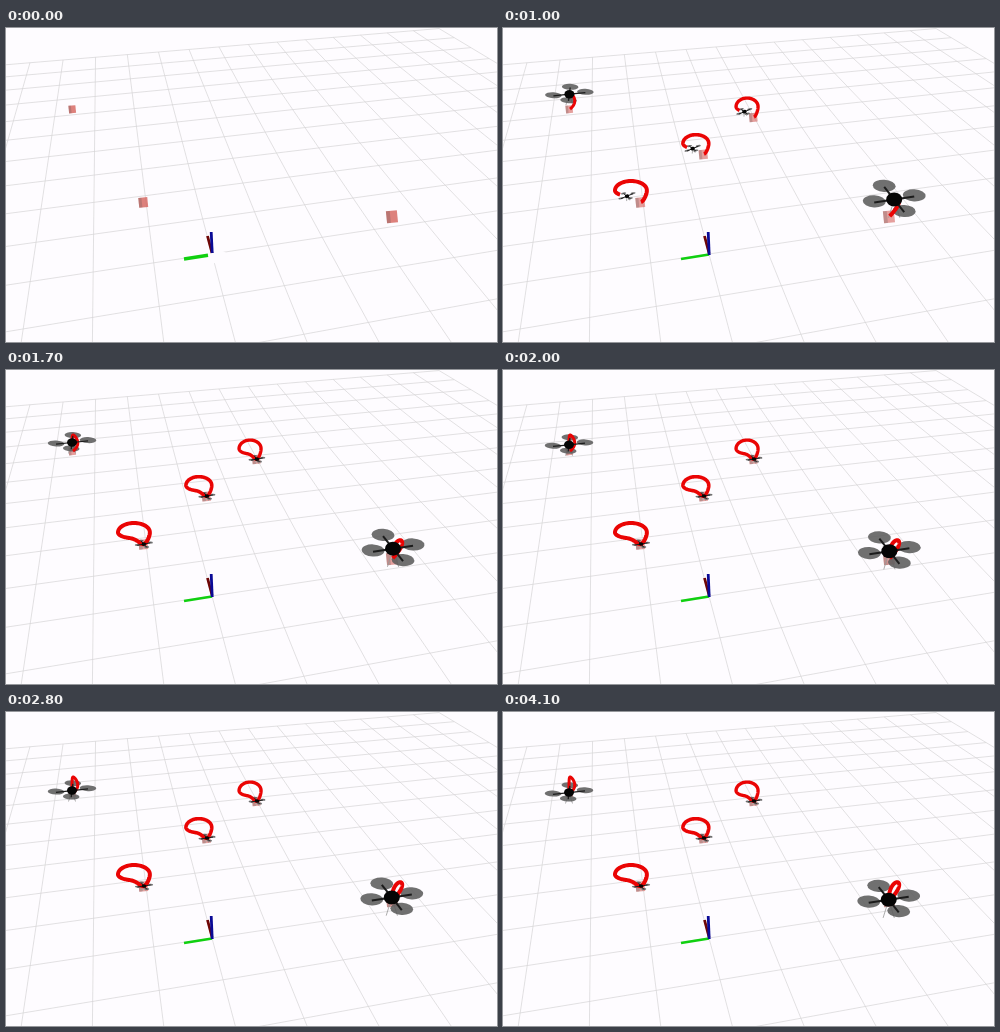
An HTML page with a canvas that plays this animation: 491x314 px, repeating every 4.2 s.

```html
<!DOCTYPE html>
<html lang="en">
<head>
<meta charset="utf-8">
<title>Drone flight</title>
<style>
  html, body { margin: 0; overflow: hidden; background: #fefcff; }
  canvas { display: block; }
</style>
</head>
<body>
<canvas id="stage" width="491" height="314"></canvas>
<script>
const ctx = document.getElementById('stage').getContext('2d');
const LOOP = 4.2, STEP = 0.1, START = 0.1, TRAIL_LAG = 0.09; // seconds
const PAPER = '#fefcff';
const { PI, sin, cos, exp, max } = Math;

// Rises from 0 to 1 at time `peak`, then decays.
const hop = (s, peak) => s / peak * exp(1 - s / peak);

// A rounded loop with a corner at the start point, flown once while slowing down.
function loopPath(scaleX, scaleY) {
  return s => {
    const corner = -PI / 4;
    const angle = corner + 2 * PI * (1 - exp(-((s / 0.68) ** 2.1)));
    const pull = max(0, cos(angle - corner)) ** 6;
    const up = sin(angle);
    return [scaleX * (16 * cos(angle) - 10 - 1.3 * pull),
            scaleY * (7.5 * pull - 11.5 - up * (up > 0 ? 9.5 : 5.7))];
  };
}

// A quick rise with a sideways swing, then a slow descent.
function hoverPath(swing, swingPeak, height) {
  return s => [swing * hop(s, swingPeak) - (1 - exp(-2 * s)), -height * hop(s, 0.62)];
}

const smallDrone = (start, box, scaleX, scaleY, late) => ({
  start, box, late, path: loopPath(scaleX, scaleY), trail: 2 + 2 * scaleX,
  arms: [[6.5 * scaleY, -scaleY], [2.7 * scaleY, 3.2 * scaleY]],
  blade: [2.6, 1], hub: [2.2, 1.8], tilt: -0.9
});

const drones = [
  { start: [67, 81], box: 7, path: hoverPath(5, 0.15, 16), trail: 3, tilt: 0,
    arms: [[16, -1.7], [-0.8, 6.7]], blade: [8.3, 3], hub: [5, 4.2] },
  smallDrone([251, 89], 8, 0.69, 0.9, true),
  smallDrone([201, 126], 8.5, 0.81, 0.92, true),
  smallDrone([138, 174], 9, 1, 1, false),
  { start: [386.7, 188.2], box: 11, path: hoverPath(10, 0.35, 18), trail: 4, tilt: 0,
    arms: [[20, -3], [10, 12.6]], blade: [11.4, 6.1], hub: [8, 7] }
];

function line(points, color, width) {
  ctx.beginPath();
  points.forEach(p => ctx.lineTo(...p));
  ctx.strokeStyle = color;
  ctx.lineWidth = width;
  ctx.stroke();
}

function ellipse(x, y, rx, ry, angle, color) {
  ctx.beginPath();
  ctx.ellipse(x, y, rx, ry, angle, 0, 2 * PI);
  ctx.fillStyle = color;
  ctx.fill();
}

// Ground plane in perspective, from its origin and two vanishing points.
function project(i, j) {
  const a = i * 0.01879, b = j * 0.0886, w = 1 + a + b;
  return [(206 + 3249 * a + 92.1 * b) / w, (226 - 235 * a - 204 * b) / w];
}

function drawGrid() {
  for (let n = -10; n <= 10; n++) {
    line([project(n, -4), project(n, 10)], '#d6d4d6', 0.7);
    if (n >= -4) line([project(-10, n), project(10, n)], '#d6d4d6', 0.7);
  }
}

function drawAxes(running) {
  if (!running) ellipse(211, 229, 11, 6, -0.15, PAPER);
  line([[178, 231], running ? [206, 226.5] : [202, 227.3]], '#10d010', running ? 2.6 : 3.4);
  line([[201.5, 208], [206, 225]], '#6e0606', 2.8);
  line([[205.2, 204], [206.2, running ? 227 : 225]], '#0a0a96', 2.8);
}

function drawBox({ start: [x, y], box }, running) {
  const h = box / 2;
  ctx.save();
  ctx.translate(x - 0.8, y);
  ctx.rotate(-0.1);
  ctx.globalAlpha = running ? 0.6 : 0.8;
  ctx.fillStyle = '#d4615b';
  ctx.fillRect(-h, -h, box, box * 1.1);
  ctx.globalAlpha = 0.25;
  ctx.fillStyle = '#555';
  ctx.fillRect(-h, -h, box * 0.35, box * 1.1);
  ctx.restore();
}

function drawDrone({ start, path, trail, arms, blade, hub, tilt }, s) {
  const at = time => path(time).map((v, axis) => v + start[axis]);
  const [x, y] = at(s), [hubX, hubY] = hub;
  const angle = tilt * hop(s, 0.25);
  const turned = (dx, dy) => [x + dx * cos(angle) - dy * sin(angle),
                              y + dx * sin(angle) + dy * cos(angle)];
  const tips = arms.flatMap(([dx, dy]) => [turned(dx, dy), turned(-dx, -dy)]);

  for (const side of [-0.7, 0.7])
    line([[x, y], turned(side * hubX, hubY * 2.6)], '#999', 0.8);
  for (const [tx, ty] of tips)
    ellipse(tx, ty - hubY / 6, ...blade, angle + 0.05, 'rgba(92,92,92,.88)');

  const points = [];
  for (let t = 0; t <= s - TRAIL_LAG; t += 0.01) points.push(at(t));
  line(points, '#ea0404', trail);

  for (const tip of tips) line([[x, y], tip], '#1c1c1c', max(1, hubX / 4));
  ellipse(x, y, hubX, hubY, angle, '#050505');
}

function draw(time) {
  const running = time >= START;
  ctx.fillStyle = PAPER;
  ctx.fillRect(0, 0, 491, 314);
  drawGrid();
  drawAxes(running);
  for (const drone of drones) {
    if (running || !drone.late) drawBox(drone, running);
    if (running) drawDrone(drone, time - START);
  }
}

ctx.lineJoin = 'round';
const begin = performance.now();
function tick() {
  const time = (performance.now() - begin) / 1000 % LOOP;
  draw(Math.floor(time / STEP + 1e-6) * STEP);
  requestAnimationFrame(tick);
}
tick();
</script>
</body>
</html>
```
